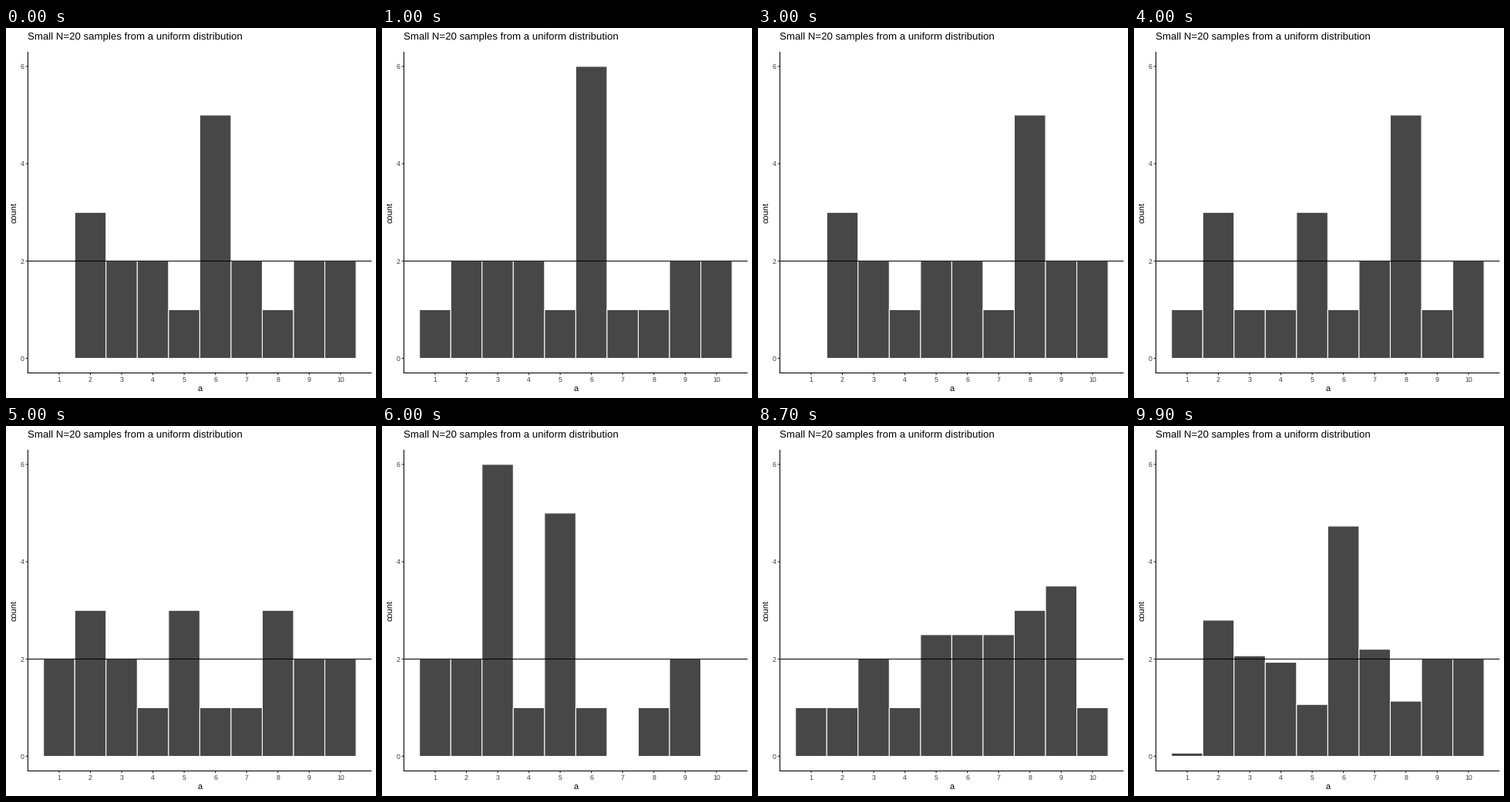
A matplotlib script for the animation above (10 s loop, 480 by 480 pixels).

```python
import math

import matplotlib.pyplot as plt
import numpy as np
from matplotlib.animation import FuncAnimation
from matplotlib.patches import Rectangle

plt.rcParams["font.family"] = ["Liberation Sans", "DejaVu Sans"]
plt.rcParams["text.hinting"] = "none"

SIZE = 480
DPI = 100
PT = 72 / DPI                      # points per pixel
LINE = 1.07 * PT

LEFT, RIGHT = 28.4, 474.4
TOP, BOTTOM = 30.9, 447.5
UNIT_X = (RIGHT - LEFT) / 11
UNIT_Y = (BOTTOM - TOP) / 6.6

BAR = "#474747"
TICK = "#262626"
LABEL = "#3c3c3c"

FRAMES = 100
HOLD = 10                          # frames per sample

# Counts of the values 1 to 10 in each sample of 20
SAMPLES = np.array([[int(c) for c in row] for row in (
    "0322152122",
    "1222161122",
    "0241231511",
    "0321221522",
    "1311312512",
    "2321311322",
    "2261510120",
    "2422113320",
    "1211340350",
    "1031215322",
)], dtype=float)


def px(x):
    return LEFT + x * UNIT_X


def py(y):
    return BOTTOM - (y + 0.3) * UNIT_Y


def counts_at(frame):
    """Bar heights: rest on a sample, then ease by a sine into the next."""
    index, step = divmod(frame, HOLD)
    start = 3 if index == 0 else 4
    t = max(0, step - start) / (HOLD - start)
    ease = (1 - math.cos(math.pi * t)) / 2
    here = SAMPLES[index]
    there = SAMPLES[(index + 1) % len(SAMPLES)]
    return here + (there - here) * ease


fig = plt.figure(figsize=(SIZE / DPI, SIZE / DPI), dpi=DPI, facecolor="white")
ax = fig.add_axes([0, 0, 1, 1])
ax.set_xlim(0, SIZE)
ax.set_ylim(SIZE, 0)
ax.axis("off")


def line(x0, y0, x1, y1, color="black", z=3):
    ax.plot([x0, x1], [y0, y1], color=color, lw=LINE, zorder=z,
            solid_capstyle="butt", snap=False)


def label(x, y, text, size, color="black", ha="center", rotation=0):
    ax.text(x, y, text, fontsize=size * PT, color=color, ha=ha,
            va="baseline", rotation=rotation, rotation_mode="anchor")


bars = []
for i in range(10):
    bar = Rectangle((px(i + 0.5), py(0)), UNIT_X, 0, facecolor=BAR,
                    edgecolor="white", lw=LINE, zorder=2, snap=False)
    bars.append(ax.add_patch(bar))

line(LEFT, py(2), RIGHT, py(2))
line(LEFT, TOP, LEFT, BOTTOM + 0.5)
line(LEFT - 0.5, BOTTOM, RIGHT, BOTTOM)

for n in range(1, 11):
    line(px(n), BOTTOM, px(n), BOTTOM + 2.75, TICK, 2.5)
    label(px(n), 459.0, str(n), 8.8, LABEL)
for n in (0, 2, 4, 6):
    line(LEFT - 2.75, py(n), LEFT, py(n), TICK, 2.5)
    label(LEFT - 4.95, py(n) + 3.2, str(n), 8.8, LABEL, ha="right")

label(LEFT, 15.0, "Small N=20 samples from a uniform distribution", 13.2,
      ha="left")
label((LEFT + RIGHT) / 2, 471.6, "a", 11)
label(13.6, (TOP + BOTTOM) / 2, "count", 11, rotation=90)


def update(frame):
    for bar, count in zip(bars, counts_at(frame)):
        bar.set_y(py(count))
        bar.set_height(py(0) - py(count))
    return bars


anim = FuncAnimation(fig, update, frames=FRAMES, interval=100,
                     repeat=True, repeat_delay=0, blit=False)
plt.show()
```
